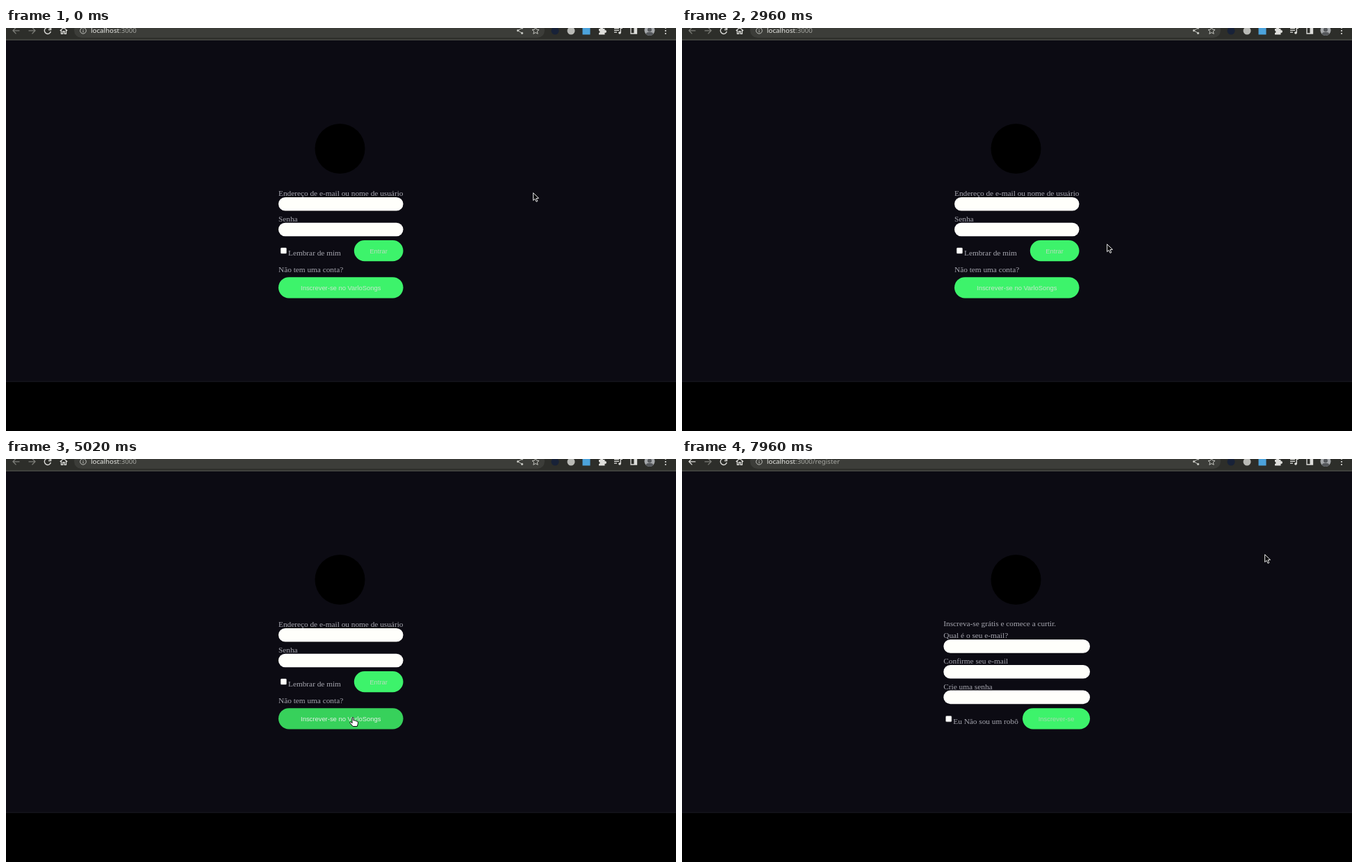
An HTML page with a canvas that plays this animation: 964x581 px, repeating every 8 s.

```html
<!DOCTYPE html>
<html lang="pt">
<head>
<meta charset="utf-8">
<title>Login</title>
<style>
  html, body { margin: 0; width: 100%; height: 100%; overflow: hidden; background: #000; }
  canvas { display: block; width: 964px; height: 581px; }
</style>
</head>
<body>
<canvas id="stage" width="964" height="581"></canvas>
<script>
const ctx = document.getElementById('stage').getContext('2d');
const LOOP = 8000;
const REGISTER_AT = 5600;
const HOVER_AT = 4220;

const SERIF = '11.3px "Liberation Serif", serif';
const SANS = '9.41px "Liberation Sans", sans-serif';
const URL_FONT = '9.72px "Noto Sans", sans-serif';
const ICON = '#dededb';
const DIM = '#7d7e79';
const GREEN = '#3df36b';
const GREEN_HOVER = '#37d15b';

// Pointer samples: time, left, top, shape
const pointer = [
  [0, 758, 237, 'arrow'], [580, 759, 238, 'arrow'], [860, 750, 273, 'arrow'],
  [1140, 667, 315, 'arrow'], [1520, 583, 283, 'arrow'], [1800, 586, 231, 'arrow'],
  [2100, 704, 212, 'arrow'], [2380, 740, 244, 'arrow'], [2680, 705, 293, 'arrow'],
  [2960, 611, 311, 'arrow'], [3240, 537, 317, 'hand'], [3520, 508, 332, 'hand'],
  [3640, 512, 332, 'arrow'], [3800, 503, 347, 'arrow'], [4080, 503, 356, 'arrow'],
  [4200, 499, 356, 'hand'], [4460, 496, 363, 'hand'], [4740, 494, 368, 'hand'],
  [5020, 494, 372, 'hand'], [5600, 497, 374, 'arrow'], [5720, 492, 373, 'hand'],
  [6740, 530, 377, 'hand'], [6980, 535, 379, 'arrow'], [7020, 666, 362, 'arrow'],
  [7300, 761, 273, 'arrow'], [7680, 803, 202, 'arrow'], [7960, 838, 137, 'arrow']
];

function rect(x, y, w, h, color) {
  ctx.fillStyle = color;
  ctx.fillRect(x, y, w, h);
}

function pill(x, y, w, h, color, r = h / 2) {
  ctx.fillStyle = color;
  ctx.beginPath();
  ctx.roundRect(x, y, w, h, r);
  ctx.fill();
}

function disc(x, y, r, color) {
  ctx.fillStyle = color;
  ctx.beginPath();
  ctx.arc(x, y, r, 0, Math.PI * 2);
  ctx.fill();
}

function text(str, x, y, font, color, align = 'left') {
  ctx.font = font;
  ctx.fillStyle = color;
  ctx.textAlign = align;
  ctx.fillText(str, x, y);
}

function stroke(d, color = ICON, width = 1.3) {
  ctx.strokeStyle = color;
  ctx.lineWidth = width;
  ctx.stroke(new Path2D(d));
}

function arrowIcon(x, dir, color) {
  const end = x + 4.5 * dir, start = x - 5 * dir, wing = end - 4.5 * dir;
  stroke(`M${start} 3.8H${end}M${wing} -.8L${end} 3.8L${wing} 8.4`, color);
}

function avatar() {
  ctx.save();
  ctx.beginPath();
  ctx.arc(926, 3.5, 7.5, 0, Math.PI * 2);
  ctx.clip();
  rect(918, -4, 16, 16, '#a5a8ab');
  disc(926, 2.5, 3, '#55585c');
  pill(920.5, 6, 11, 9, '#55585c', 4);
  ctx.restore();
}

function toolbar(register) {
  rect(0, 0, 964, 17, '#2d2e2a');
  rect(0, 16.5, 964, 1.2, '#555650');
  pill(98, -7, 677, 21, '#3c3d39');

  arrowIcon(14.5, -1, register ? ICON : DIM);
  arrowIcon(37.5, 1, DIM);
  stroke('M63.6 1A4.6 4.6 0 1 0 64.4 5', ICON, 1.4);
  stroke('M64.6 -1V2.5H61', ICON, 1.4);
  stroke('M77.8 4L83 -.8L88.2 4M79.5 3V8.3H81.8V5H84.2V8.3H86.5V3');
  stroke('M115.3 3.8A4.3 4.3 0 1 1 106.7 3.8A4.3 4.3 0 1 1 115.3 3.8M111 3.3V6.3M111 1.2V2.3', '#c2c3be', 1);

  text('localhost', 122, 7, URL_FONT, '#ecece8');
  const hostEnd = 122 + ctx.measureText('localhost').width;
  text(':3000' + (register ? '/register' : ''), hostEnd, 7, URL_FONT, '#a5a6a1');

  stroke('M742.5 0L736.5 3.7L742.5 7.4', '#c2c3be', 1);
  disc(742.5, 0, 1.6, '#c2c3be');
  disc(736.5, 3.7, 1.6, '#c2c3be');
  disc(742.5, 7.4, 1.6, '#c2c3be');
  stroke('M762 -1.2L763.5 2.2L767 2.5L764.3 4.9L765.2 8.4L762 6.5L758.8 8.4L759.7 4.9L757 2.5L760.5 2.2Z', '#c2c3be', 1);

  disc(790, 4, 5.5, '#182238');
  disc(813, 4, 5.5, '#b9bab6');
  rect(829.5, -1, 11, 10.5, '#4ca3dc');

  rect(853, 1, 8.5, 8.5, ICON);
  disc(857, 0.6, 2, ICON);
  disc(862, 5, 2, ICON);
  disc(853, 5.5, 1.5, '#2d2e2a');

  stroke('M875 .5H882M875 3.3H882M875 6.1H879M884.3 7V.4H887');
  disc(883, 7, 1.8, ICON);
  stroke('M899 -1H907.5V8H899Z');
  rect(903.5, -1, 4, 9, ICON);
  avatar();
  for (const y of [0, 4, 8]) disc(949, y, 1.1, ICON);
}

function label(str, x, y) {
  text(str, x, y, SERIF, '#a6a6af');
}

function field(str, x, w, baseline, top) {
  label(str, x, baseline);
  pill(x, top, w, 19.6, '#fffffb');
}

function checkbox(x, y) {
  pill(x, y, 9.2, 9.2, '#777779', 1.7);
  pill(x + 0.7, y + 0.7, 7.8, 7.8, '#fffffd', 1.2);
}

function button(str, x, y, w, color, ink) {
  pill(x, y, w, 30.2, color);
  text(str, x + w / 2, y + 18.5, SANS, ink, 'center');
}

function loginForm(hover) {
  field('Endereço de e-mail ou nome de usuário', 392, 179.5, 242, 244);
  field('Senha', 392, 179.5, 278.7, 280.7);
  checkbox(394.8, 316.4);
  label('Lembrar de mim', 406, 328);
  button('Entrar', 500.8, 306, 70.7, GREEN, '#b5dcbc');
  label('Não tem uma conta?', 392, 351.5);
  button('Inscrever-se no VarloSongs', 392, 359.2, 179.5,
    hover ? GREEN_HOVER : GREEN, hover ? '#e3efe5' : '#c9e6ce');
}

function registerForm() {
  label('Inscreva-se grátis e comece a curtir.', 376.3, 241.3);
  field('Qual é o seu e-mail?', 376.3, 210.7, 258.3, 260.2);
  field('Confirme seu e-mail', 376.3, 210.7, 295, 297);
  field('Crie uma senha', 376.3, 210.7, 331.7, 333.6);
  checkbox(379.1, 370);
  label('Eu Não sou um robô', 390.3, 381.7);
  button('Inscrever-se', 490, 359.2, 97, GREEN, '#a9d8b2');
}

const shapes = {
  arrow: {
    path: new Path2D('M.6 .7V11.6L3.1 9.3L5 13.4L6.8 12.6L5 8.6L8.5 8.3Z'),
    fill: '#08080a', line: '#e9e9e9'
  },
  hand: {
    path: new Path2D('M4 8V1.7Q4 .5 5 .5T6 1.7V5Q7.8 4.3 8.3 5.5Q9.8 5 10.3 6.1' +
      'Q12.3 5.8 12.4 7.5V9.5L11.3 13.5H5.2L1 8.7Q.3 7.2 1.5 7Q2.5 6.8 4 8.8Z'),
    fill: '#fff', line: '#0a0a0a'
  }
};

function drawPointer(t) {
  const [, x, y, kind] = pointer.findLast(p => p[0] <= t);
  const shape = shapes[kind];
  ctx.save();
  ctx.translate(x, y);
  ctx.fillStyle = shape.fill;
  ctx.strokeStyle = shape.line;
  ctx.lineWidth = 1;
  ctx.lineJoin = 'round';
  ctx.fill(shape.path);
  ctx.stroke(shape.path);
  ctx.restore();
}

function draw(t) {
  const register = t >= REGISTER_AT;
  rect(0, 0, 964, 581, '#000');
  rect(0, 17, 964, 493, '#0c0b13');
  rect(0, 509.3, 964, 1, '#1a1a21');
  toolbar(register);
  disc(480.5, 174, 36, '#000');
  if (register) registerForm();
  else loginForm(t >= HOVER_AT);
  drawPointer(t);
}

function tick() {
  draw(performance.now() % LOOP);
  requestAnimationFrame(tick);
}
tick();
</script>
</body>
</html>
```
